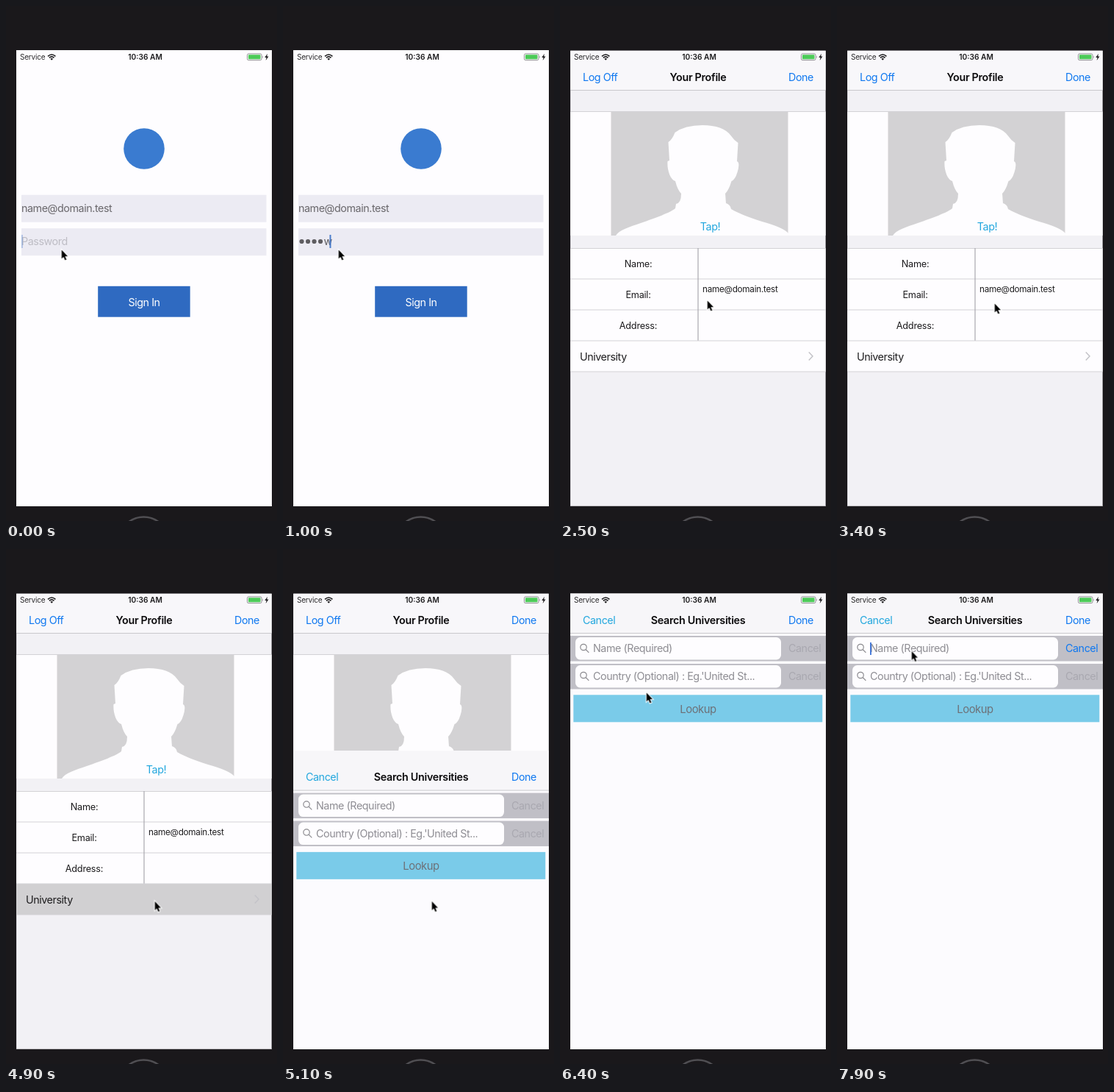
An HTML page that plays this animation: 369 px wide and 700 px high, repeating every 8 s.

```html
<!DOCTYPE html>
<html lang="en">
<head>
<meta charset="utf-8">
<title>Sign in and search</title>
<style>
html, body { margin: 0; width: 100%; height: 100%; overflow: hidden; background: #1a181b; }
svg { display: block; width: 369px; height: 700px; }
text { font: 14.3px Inter, Roboto, sans-serif; letter-spacing: -.03em; }
.mid { text-anchor: middle; }
.title { font-weight: 600; letter-spacing: -.02em; fill: #0c0b0d; }
.link { fill: #0f78f0; }
.cyan { fill: #22a7de; }
.status { font-size: 10px; letter-spacing: -.02em; fill: #2a292b; }
.clock { font-size: 10.2px; font-weight: 600; letter-spacing: 0; fill: #1b1a1c; }
.label { font-size: 12.7px; letter-spacing: -.02em; fill: #1d1c1e; }
.mail { font-size: 11.7px; letter-spacing: -.02em; fill: #1d1c1e; }
.hint { fill: #8e8d93; }
.off { fill: #a9a8b0; }
.entry { fill: #69676b; }
.rule { stroke: #d3d2d6; fill: none; }

/* one loop is 8 s, so 1% is 80 ms */
.login, .empty, .press, .tapped, .blink, .letter, .dot { animation: 8s step-end infinite; }
.login { animation-name: login; }
@keyframes login { 0% { visibility: visible; } 30%, 100% { visibility: hidden; } }

.empty { animation-name: empty; }
@keyframes empty { 0% { opacity: 1; } 2.5%, 100% { opacity: 0; } }

.letter, .dot { opacity: 0; }
.letter { animation-name: letter; animation-delay: calc(200ms * (var(--i) + 1)); }
.letter.last { animation-name: dot; }
.dot { animation-name: dot; animation-delay: calc(200ms * (var(--i) + 2)); }
@keyframes letter { 0% { opacity: 1; } 2.5%, 100% { opacity: 0; } }
@keyframes dot { 0% { opacity: 1; } 30%, 100% { opacity: 0; } }

.caret { animation: type 8s linear infinite; }
@keyframes type {
  0%, 2.49% { transform: none; opacity: .35; }
  2.5% { transform: none; opacity: 1; animation-timing-function: steps(8, jump-start); }
  22.5%, 100% { transform: translateX(68px); opacity: 1; }
}

.press { animation-name: press; }
@keyframes press { 0% { opacity: 0; } 57%, 100% { opacity: 1; } }

/* critically damped spring */
.sheet { animation: slide 8s linear infinite; }
@keyframes slide {
  0% { transform: translateY(619px); }
  62.225% {
    transform: translateY(619px);
    animation-timing-function: linear(0, .105 5%, .3 10%, .489 15%, .6435 20%, .7585 25%,
      .84 30%, .933 40%, .973 50%, .9895 60%, .996 70%, .9985 80%, 1);
  }
  69.725%, 100% { transform: none; }
}

.tapped { animation-name: tapped; }
@keyframes tapped { 0% { fill: #a9a8b0; } 86%, 100% { fill: #0f78f0; } }

.blink { animation-name: blink; }
@keyframes blink {
  0% { opacity: 0; }
  86% { opacity: 1; }
  92.2% { opacity: 0; }
  98%, 100% { opacity: 1; }
}

.pointer { animation: point 8s ease-in-out infinite; }
@keyframes point {
  0%, 18% { transform: translate(75.5px, 331px); }
  22.5% { transform: translate(195px, 390px); }
  24%, 35% { transform: translate(200.5px, 400px); }
  40%, 46% { transform: translate(214.5px, 404px); }
  53% { transform: translate(205px, 495px); }
  57.5%, 69% { transform: translate(202.5px, 478.5px); }
  79% { transform: translate(119px, 200px); }
  84%, 100% { transform: translate(101.5px, 138.5px); }
}
</style>
</head>
<body>
<svg viewBox="0 0 369 700">
  <defs>
    <clipPath id="screen"><rect x="14.100" y="60.700" width="347.600" height="618.700"/></clipPath>
    <g id="search">
      <rect x="14" y="118" width="348" height="34.500" fill="#c0bfc6"/>
      <rect x="21" y="120" width="280" height="30.500" rx="6.500" fill="#fefdff"/>
      <g fill="none" stroke="#8a898e" stroke-width="1.200">
        <circle cx="32" cy="133.500" r="4.200"/>
        <path d="M35 136.500l4.300 4.300"/>
      </g>
    </g>
  </defs>

  <rect width="369" height="700" fill="#1a181b"/>
  <circle cx="187.500" cy="728.500" r="34" fill="none" stroke="#504f53" stroke-width="2.500"/>

  <g clip-path="url(#screen)">
    <!-- profile -->
    <rect x="14" y="60" width="348" height="620" fill="#f2f1f5"/>
    <rect x="14" y="60" width="348" height="54" fill="#f8f7fa"/>
    <path d="M14 114.500H362" stroke="#c9c8cc"/>
    <text class="link" x="31" y="101.500">Log Off</text>
    <text class="title mid" x="188" y="101.500">Your Profile</text>
    <text class="link" x="311" y="101.500">Done</text>

    <rect x="14" y="144" width="348" height="168" fill="#fefdff"/>
    <path class="rule" d="M14 143.500H362"/>
    <rect x="69.500" y="144" width="241" height="168" fill="#d3d2d4"/>
    <path fill="#fefdff" d="M76 312C80 305 95 300 110 295C130 288 150 281 157 275L158 269Q165 268 165 255Q160 250 157 238C150 236 145.500 222 146.500 211L149 210L147.500 185Q152.500 182 156.500 172Q170 162 194 162Q222 162 232.500 176Q236.500 182 242.500 186L241 211Q245.500 213 241.500 226Q238.500 236 233.500 238Q230 250 225 255L226 268Q232 270 233 276C245 283 265 290 282 295Q305 302 311 309V312Z"/>
    <text class="cyan mid" x="204.500" y="305">Tap!</text>

    <rect x="14" y="329" width="348" height="168" fill="#fefdff"/>
    <path class="rule" d="M14 329.500H362M14 371H362M14 413H362"/>
    <path d="M188 329V455" stroke="#a9a8ad" stroke-width="1.200"/>
    <text class="label mid" x="106.500" y="354.500">Name:</text>
    <text class="label mid" x="106.500" y="396.500">Email:</text>
    <text class="label mid" x="106.500" y="438.500">Address:</text>
    <text class="mail" x="194" y="389">name@domain.test</text>
    <rect class="press" x="14" y="455" width="348" height="42" fill="#d1d0d2"/>
    <path class="rule" d="M14 455H362M14 497H362"/>
    <text x="27" y="481.500" fill="#1d1c1e">University</text>
    <path d="M338.800 470.500l5.200 5.500l-5.200 5.500" fill="none" stroke="#c4c3c8" stroke-width="1.500"/>

    <!-- search sheet -->
    <g class="sheet">
      <rect x="14" y="60.700" width="348" height="620" fill="#fcfbfe"/>
      <rect x="14" y="60.700" width="348" height="53.300" fill="#f7f6f9"/>
      <path d="M14 114.500H362" stroke="#c9c8cc"/>
      <text class="cyan" x="31" y="101.500">Cancel</text>
      <text class="title mid" x="188" y="101.500">Search Universities</text>
      <text class="link" x="311" y="101.500">Done</text>
      <use href="#search"/>
      <use href="#search" y="38"/>
      <text class="hint" x="45" y="140">Name (Required)</text>
      <text class="hint" x="45" y="178">Country (Optional) : Eg.'United St...</text>
      <text class="tapped" x="311" y="140">Cancel</text>
      <text class="off" x="311" y="178">Cancel</text>
      <rect class="blink" x="45" y="127" width="1.800" height="17" fill="#3b72d8"/>
      <rect x="18.300" y="198.300" width="339" height="37" fill="#7acbe9"/>
      <text class="mid" x="188" y="222.500" fill="#6d7178" style="font-size:14.8px">Lookup</text>
    </g>

    <!-- sign in -->
    <g class="login">
      <rect x="14" y="60" width="348" height="620" fill="#fefdff"/>
      <circle cx="188" cy="194" r="27.800" fill="#3a7bd0"/>
      <path d="M21 256.700H354.500V293.700H21ZM21 302.200H354.500V339.200H21Z" fill="#ecebf3"/>
      <text class="entry" x="21" y="280">name@domain.test</text>
      <text class="empty" x="21" y="325" fill="#bdbcc4">Password</text>
      <g id="secret" fill="#5f5d61"></g>
      <rect class="caret" x="21" y="311" width="1.800" height="18" fill="#3b72c8"/>
      <rect x="125.200" y="380.800" width="125.500" height="41.900" fill="#2f6ac1"/>
      <text class="mid" x="188" y="407.500" fill="#fff">Sign In</text>
    </g>

    <!-- status bar -->
    <text class="status" x="19" y="73">Service</text>
    <path d="M57 68.300Q62.200 63.700 67.400 68.300M58.900 70.400Q62.200 67.500 65.500 70.400" fill="none" stroke="#1b1a1c" stroke-width="1.600"/>
    <path d="M60.300 71.800Q62.200 70.300 64.100 71.800L62.200 73.800Z" fill="#1b1a1c"/>
    <text class="clock mid" x="189.500" y="73">10:36 AM</text>
    <rect x="328.500" y="64.900" width="19.500" height="8.700" rx="1.800" fill="none" stroke="#77767a" stroke-width=".8"/>
    <rect x="330" y="66.300" width="16.500" height="5.900" rx=".6" fill="#4ccb58"/>
    <path d="M349 67.500q1.500 1.700 0 3.400Z" fill="#77767a"/>
    <path d="M356 64.800L352.300 70H354.600L353.700 74L357.500 68.600H355.200Z" fill="#1b1a1c"/>
  </g>

  <g class="pointer">
    <path d="M.3 .6V12.400L2.900 9.900L4.900 14.600L6.800 13.800L4.900 9.200H8.500Z" stroke="#fff" stroke-width="2" paint-order="stroke"/>
  </g>
</svg>
<script>
// each typed letter shows briefly, then turns into a dot; the last one stays
const word = "password", step = 8.5;
document.getElementById("secret").innerHTML = [...word].map((c, i) => {
  const last = i === word.length - 1;
  const letter = `<text class="letter${last ? " last" : ""}" style="--i:${i}" x="${21.5 + i * step}" y="325">${c}</text>`;
  return last ? letter : letter + `<circle class="dot" style="--i:${i}" cx="${25.5 + i * step}" cy="320" r="3.1"/>`;
}).join("");
</script>
</body>
</html>
```
